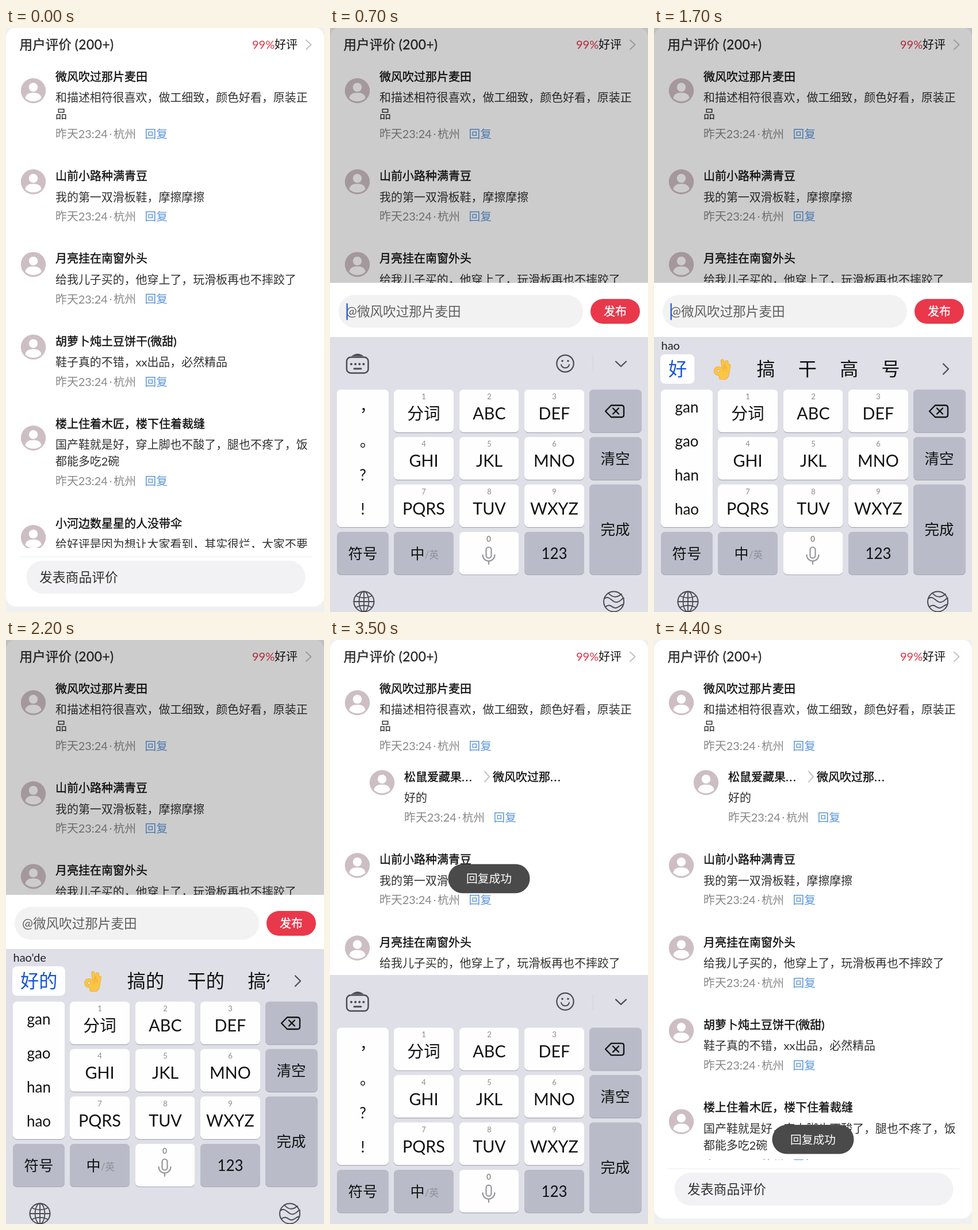
An HTML page for the animation above (4.8 s loop, 553 by 1013 pixels).

```html
<!DOCTYPE html>
<html lang="zh-CN">
<head>
<meta charset="utf-8">
<title>商品评价回复</title>
<style>
html, body { margin: 0; width: 100%; height: 100%; overflow: hidden; background: #f0f0f0; }
svg { display: block; width: 553px; height: 1013px; font-family: Lato, "Noto Sans CJK SC", "Noto Sans CJK", sans-serif; }
text { white-space: pre; }
</style>
</head>
<body>
<svg id="stage" viewBox="0 0 553 1013"></svg>
<script>
const LOOP = 4800, STEP = 100;
const LINK = '#5a96da', BLUE = '#1554dc', INK = '#111', ICON = '#4b4c52';

// Text placed by the vertical centre of its glyph box
const txt = (x, cy, s, size, fill, more = '') =>
  `<text x="${x}" y="${cy + size * 0.38}" font-size="${size}" fill="${fill}" ${more}>${s}</text>`;
const mid = (x, cy, s, size, fill, more = '') => txt(x, cy, s, size, fill, `text-anchor="middle" ${more}`);
const heavy = (x, cy, s, size, fill, more = '') =>
  txt(x, cy, s, size, fill, `stroke="${fill}" stroke-width=".35" ${more}`);
const spaced = (s, gap) => `<tspan letter-spacing="${gap}">${s}</tspan>`;
const box = (x, y, w, h, r, fill, more = '') =>
  `<rect x="${x}" y="${y}" width="${w}" height="${h}" rx="${r}" fill="${fill}" ${more}/>`;
const line = (d, color, w = 2, more = '') =>
  `<path d="${d}" fill="none" stroke="${color}" stroke-width="${w}" stroke-linecap="round" stroke-linejoin="round" ${more}/>`;
const ring = (x, y, r, w = 2) => `<circle cx="${x}" cy="${y}" r="${r}" fill="none" stroke="${ICON}" stroke-width="${w}"/>`;
const group = (id, body, more = '') => `<g id="${id}" ${more}>${body}</g>`;

// ---- Review list ----
const DOTS = spaced('...', 1.8);
const reviews = [
  ['微风吹过那片麦田', '和描述相符很喜欢，做工细致，颜色好看，原装正', '品'],
  ['山前小路种满青豆', '我的第一双滑板鞋，摩擦摩擦'],
  ['月亮挂在南窗外头', '给我儿子买的，他穿上了，玩滑板再也不摔跤了'],
  ['胡萝卜炖土豆饼干(微甜)', '鞋子真的不错，xx出品，必然精品'],
  ['楼上住着木匠，楼下住着裁缝', '国产鞋就是好，穿上脚也不酸了，腿也不疼了，饭', '都能多吃2碗'],
  ['小河边数星星的人没带伞', '给好评是因为想让大家看到，其实很烂，大家不要', '买']
];

const avatar = (x, y) => `<g transform="translate(${x} ${y})"><circle r="21.7" fill="#cdbec4"/>
  <circle cy="-6" r="7.7" fill="#fff"/>
  <path d="M-14 13Q-13 3.5 0 3.5Q13 3.5 14 13Q8 18.5 0 18.5Q-8 18.5 -14 13" fill="#fff"/></g>`;

function review(x, y, [name, ...rows]) {
  const meta = y + 41 + rows.length * 29.2;
  return avatar(x + 47.5, y + (rows.length > 1 ? 24.8 : 10.3)) +
    heavy(x + 86, y, name, 20, '#0c0c0c') +
    rows.map((s, i) => txt(x + 86, y + 36.5 + i * 29, s, 19.95, '#303030')).join('') +
    txt(x + 86, meta, '昨天23:24', 19.9, '#888') +
    `<circle cx="${x + 182}" cy="${meta + 1}" r="1.2" fill="#888"/>` +
    txt(x + 187, meta, '杭州', 19.6, '#888') +
    txt(x + 241.5, meta, '回复', 19.7, LINK);
}

let rowY = 84;
const rows = reviews.map(r => {
  const html = review(0, rowY, r);
  rowY += r.length > 2 ? 172.5 : 143.3;
  return html;
});

const reply = review(43, 237, ['松鼠爱藏果' + DOTS, '好的']) +
  line('M269 228l8 9l-8 9', '#c4c4c4') +
  heavy(283, 237, reviews[0][0].slice(0, 5) + DOTS, 20, '#0c0c0c');

const page = box(0, 0, 553, 1013, 0, '#f0f0f0') + box(0, -1, 553, 1004.5, 18, '#fff') +
  heavy(23.5, 28.5, '用户评价 ' + spaced('(200+)', 0.6), 22.6, '#262626') +
  txt(428, 28.5, '99%', 20, '#dc3548') + txt(467, 28.5, '好评', 20, '#111') +
  line('M522 21l8.5 8l-8.5 8', '#c2c2c2') +
  `<g clip-path="url(#listClip)">${rows[0]}${group('reply', reply)}${group('rest', rows.slice(1).join(''))}</g>` +
  line('M25 917H532', '#ececec', 1) +
  box(35.5, 924, 485, 57, 28.5, '#f2f2f4') +
  txt(58, 952.5, '发表商品评价', 22.8, '#303030');

// ---- Reply field, drawn from its top edge ----
const field = box(0, 0, 553, 100, 0, '#fff') + box(15, 21, 425, 57, 28.5, '#f2f2f2') +
  group('hint', txt(28, 49.5, '@' + reviews[0][0], 22.6, '#5f5f5f')) +
  group('typed', txt(28.5, 49.5, '好的', 22.6, '#151515')) +
  '<rect id="caret" y="35.5" width="2.4" height="29" fill="#2a62d8"/>' +
  box(453, 28, 86, 43, 21.5, '#ea384b') +
  mid(496, 49.5, '发布', 20, '#fff', 'stroke="#fff" stroke-width=".4"');

// ---- Keyboard, drawn from its top edge ----
const cols = [[12, 90], [111, 104], [225, 103.5], [338, 104], [451, 91]];
const rowTop = r => 91.3 + r * 82.2;
const key = (c, r, fill, span = 1) => {
  const [x, w] = cols[c], h = 74 + (span - 1) * 82.2;
  return box(x, rowTop(r) + 1.2, w, h, 7, '#a6a8b2') + box(x, rowTop(r), w, h, 7, fill);
};
const GREY = '#b9bcc8', WHITE = '#fefefe';
const letters = ['分词', 'ABC', 'DEF', 'GHI', 'JKL', 'MNO', 'PQRS', 'TUV', 'WXYZ'].map((s, i) => {
  const c = 1 + i % 3, r = Math.floor(i / 3), x = cols[c][0] + 52;
  return key(c, r, WHITE) + mid(x, rowTop(r) + 12, i + 1, 13, '#8c8c90') +
    mid(x, rowTop(r) + 41, s, 28.8, INK);
}).join('');

const deleteIcon = line('M489 118.5H507Q511 118.5 511 122.5V135Q511 139 507 139H489L479 128.7Z', INK, 2.3) +
  line('M492 123.5l10 10m0-10l-10 10', INK, 2.3);
const mic = line('M271.5 369a4.5 4.5 0 0 1 9 0v10a4.5 4.5 0 0 1-9 0zM265.5 378a10.5 10.5 0 0 0 21 0M276 389v5', '#96969b', 2.2);
const globe = ring(59, 459, 17.5) +
  line('M41.5 459h35M59 441.5v35M45 449q14 7 28 0M45 469q14-7 28 0', ICON, 1.8) +
  `<ellipse cx="59" cy="459" rx="8.5" ry="17.5" fill="none" stroke="${ICON}" stroke-width="1.8"/>`;
const waves = ring(493.5, 459, 17.5) +
  line('M477 454c9-8 14 8 22 6s8-7 12-7M479 468c9-7 12 3 18 2s8-6 13-6M484 444c5 6 10 8 16 6s5-4 7-4', ICON, 1.9);

const toolbar = box(29, 35, 37.5, 27.5, 7, 'none', `stroke="${ICON}" stroke-width="2.5"`) +
  `<path d="M37 33.5Q48 24.5 59 33.5Z" fill="${ICON}"/>` +
  line('M37 47h.1m7 0h.1m7 0h.1m7 0h.1', ICON, 4) + line('M42 55h12', ICON, 3) +
  ring(409, 46, 14.7, 2.2) + line('M404 41.5h.1m9.8 0h.1', ICON, 3.5) + line('M402 48a7.2 7.2 0 0 0 14 0', ICON) +
  line('M457.5 33v27', '#cfd0d8', 1) + line('M497 42.5l9 8.5l9-8.5', ICON, 2.2);

const keyboard = box(0, 0, 553, 478, 0, '#dedfe7') + group('strip', '') +
  key(0, 0, WHITE, 3) + group('side', '') + letters +
  key(4, 0, GREY) + deleteIcon +
  key(4, 1, GREY) + mid(496, 210.5, '清空', 25.5, INK) +
  key(4, 2, GREY, 2) + mid(496, 333.5, '完成', 25.5, INK) +
  key(0, 3, GREY) + mid(57, 375, '符号', 25.5, INK) +
  key(1, 3, GREY) + mid(152, 375, '中', 25, INK) + txt(165, 378, '/英', 16.5, '#8e9099') +
  key(2, 3, WHITE) + mid(276, 350, '0', 13, '#66666a') + mic +
  key(3, 3, GREY) + mid(390, 375, '123', 26, INK) +
  globe + waves;

// ---- Input states: start time, spelling, side column, candidates (* is the hand) ----
const syllables = ['gan', 'gao', 'han', 'hao'];
const states = [
  { at: 0, bar: true },
  { at: 1050, spell: 'h', side: ['g', 'h', 'i'], words: ['好', '*', '和', '个', '还', '哈'] },
  { at: 1350, spell: 'ha', side: ['ga', 'ha'], words: ['哈', '*', '好', '还', '干', '高'] },
  { at: 1650, spell: 'hao', side: syllables, words: ['好', '*', '搞', '干', '高', '号'] },
  { at: 1950, spell: "hao'd", side: syllables, words: ['好的', '*', '搞的', '干的', '搞得'] },
  { at: 2150, spell: "hao'de", side: syllables, words: ['好的', '*', '搞的', '干的', '搞得'] },
  { at: 2700, words: ['*', '呢', '好的', '吧', '谢谢'] },
  { at: 3250, bar: true }
];
const COMMIT = 2700, SENT = 3300;

function hand(x, y) {
  const shape = (color, grow) =>
    line('M4 5L1-14M8 5L8.5-12M10 8L12.5-6', color, 4.6 + grow) +
    `<circle cx="-6" cy="3.5" r="5.2" fill="none" stroke="${color}" stroke-width="${4.4 + grow}"/>` +
    `<path d="M-5 9Q0 4 11 5Q13 13 7 17H-3Z" fill="${color}" stroke="${color}" stroke-width="${grow + 1}"/>`;
  return `<g transform="translate(${x} ${y})">${shape('#e8a52c', 1.4)}${shape('#fcc644', 0)}${line('M4 3l-1-9M8 4v-8', '#e8a52c', 0.8)}</g>`;
}

function stripFor(s) {
  if (s.bar) return toolbar;
  let x = 25;
  const words = s.words.map((w, i) => {
    const width = w === '*' ? 41 : w.length * 32.4;
    const first = s.spell && i === 0;
    const out = (first ? box(11, 30, width + 27, 51, 8, '#fff') : '') +
      (w === '*' ? hand(x + 20.5, 55.5) : txt(x, 55, w, 32.2, first ? BLUE : INK));
    x += width + 40;
    return out;
  }).join('');
  const end = s.spell ? line('M503 46.5l9 9l-9 9', ICON, 2.2)
    : ring(507, 55.5, 14.5) + line('M502 50.5l10 10m0-10l-10 10', ICON);
  return `<g clip-path="url(#wordClip)">${words}</g>${end}` + (s.spell ? txt(12.5, 14.5, s.spell, 20, '#222') : '');
}

function sideFor(s) {
  const at = (x, y, c) => `<text x="${x}" y="${y}" font-size="26" fill="${INK}"${x === 57 ? ' text-anchor="middle"' : ''}>${c}</text>`;
  if (s.side) return s.side.map((c, i) => at(57, 131 + i * 59, c)).join('');
  return at(52, 129, '，') + at(52, 190, '。') + at(57, 249, '?') + at(57, 308, '!');
}

document.getElementById('stage').innerHTML =
  `<defs><clipPath id="listClip"><rect width="553" height="902"/></clipPath>
   <clipPath id="wordClip"><rect width="458" height="90"/></clipPath></defs>` +
  page +
  '<rect id="shade" width="553" height="1013"/>' +
  group('field', field) + group('keyboard', keyboard) +
  group('toast', box(205.5, -25, 142, 50.5, 25, '#4a4a4a') + mid(276.5, 0, '回复成功', 19.8, '#fff'));

const el = {};
document.querySelectorAll('#stage [id]').forEach(n => el[n.id] = n);

const ramp = (t, a, b) => Math.min(1, Math.max(0, (t - a) / (b - a)));
const easeOut = p => 1 - (1 - p) ** 2;
const easeInOut = p => p < 0.5 ? 2 * p * p : 1 - 2 * (1 - p) ** 2;
const show = (node, on) => node.setAttribute('display', on ? 'inline' : 'none');
const moveY = (node, y) => node.setAttribute('transform', `translate(0 ${y.toFixed(2)})`);
const fade = (node, o) => { show(node, o > 0); node.setAttribute('opacity', o); };

let shown = null;
function draw(t) {
  const sent = t >= SENT, typed = t >= COMMIT;
  show(el.reply, sent);
  moveY(el.rest, sent ? 124.2 : 0);

  const leave = 1 - ramp(t, 3230, 3380);
  fade(el.shade, 0.2 * ramp(t, 150, 300) * leave);
  fade(el.field, t < 250 ? 0 : leave);
  moveY(el.field, 913 - 471 * easeOut(ramp(t, 250, 624)));

  const up = easeOut(ramp(t, 250, 650)) - easeInOut(ramp(t, 3400, 3860));
  moveY(el.keyboard, 1013 - 477 * up);

  show(el.hint, !typed);
  show(el.typed, typed);
  const phase = typed ? t - COMMIT : t - 300;
  show(el.caret, (phase + 1000) % 1000 < 500);
  el.caret.setAttribute('x', typed ? 73 : 28.5);

  fade(el.toast, ramp(t, 3300, 3450));
  moveY(el.toast, 389 + 477 * easeInOut(ramp(t, 3426, 3886)));

  const state = states.filter(s => t >= s.at).pop();
  if (state !== shown) {
    shown = state;
    el.strip.innerHTML = stripFor(state);
    el.side.innerHTML = sideFor(state);
  }
}

const start = performance.now();
function tick() {
  const t = (performance.now() - start) % LOOP;
  draw(Math.floor(t / STEP) * STEP);
  requestAnimationFrame(tick);
}
draw(0);
requestAnimationFrame(tick);
</script>
</body>
</html>
```
